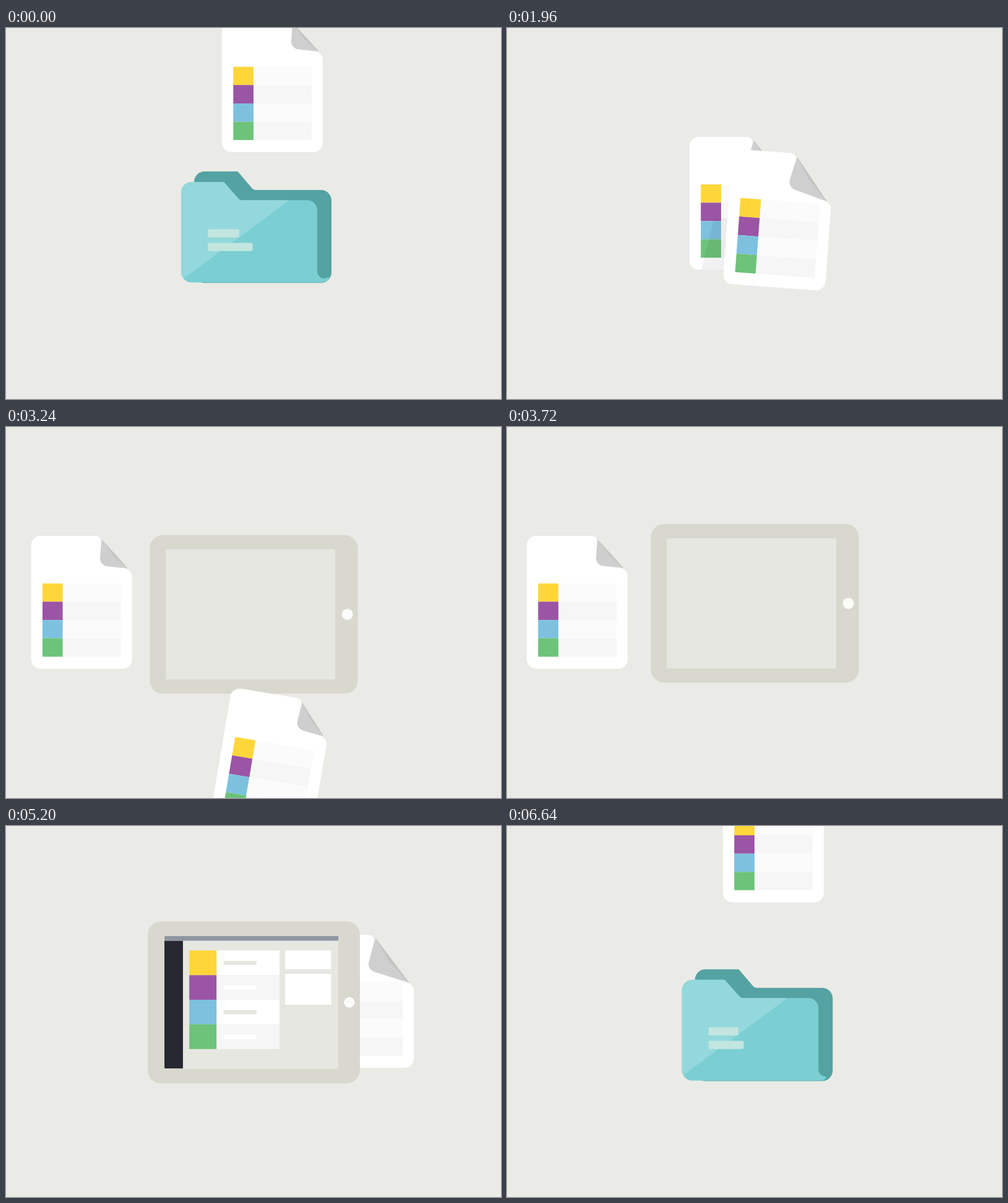
An HTML page with a canvas for the animation above (6680 ms loop, 800 px wide and 600 px high).

```html
<!DOCTYPE html>
<html lang="en">
<head>
<meta charset="utf-8">
<title>Document, folder, tablet</title>
<style>
html, body { margin: 0; width: 100%; height: 100%; overflow: hidden; background: #eaebe6; }
canvas { display: block; width: 800px; height: 600px; }
</style>
</head>
<body>
<canvas id="stage" width="800" height="600"></canvas>
<script>
const LOOP = 6680;
const BG = '#eaebe6';
const ROWS = ['#ffd63a', '#9a55a5', '#7dc1df', '#6dc37a'];
const ctx = document.getElementById('stage').getContext('2d');

const clamp = v => Math.max(0, Math.min(1, v));
const mix = (a, b, p) => a + (b - a) * p;
const part = (t, start, length) => clamp((t - start) / length);
const easeOut = p => 1 - (1 - p) ** 3;

// Cubic bezier easing with handles (a, 0) and (b, 1).
function curve(x, a = 0.8, b = 0.2) {
  if (x <= 0 || x >= 1) return clamp(x);
  let lo = 0, hi = 1, s = 0.5;
  for (let i = 0; i < 24; i++) {
    s = (lo + hi) / 2;
    const at = 3 * a * s * (1 - s) ** 2 + 3 * b * s * s * (1 - s) + s ** 3;
    if (at < x) lo = s; else hi = s;
  }
  return s * s * (3 - 2 * s);
}

// Value at time t from [time, value] steps, smoothed between them.
function keys(t, steps) {
  if (t <= steps[0][0]) return steps[0][1];
  for (let i = 1; i < steps.length; i++) {
    const [t0, v0] = steps[i - 1], [t1, v1] = steps[i];
    if (t <= t1) {
      const p = (t - t0) / (t1 - t0);
      return mix(v0, v1, p * p * (3 - 2 * p));
    }
  }
  return steps[steps.length - 1][1];
}

function box(x, y, w, h, color, r = 0) {
  if (w <= 0 || h <= 0) return;
  ctx.fillStyle = color;
  ctx.beginPath();
  ctx.roundRect(x, y, w, h, r);
  ctx.fill();
}

function shape(color, points) {
  ctx.fillStyle = color;
  ctx.beginPath();
  points.forEach(([x, y]) => ctx.lineTo(x, y));
  ctx.fill();
}

function scaled(cx, cy, k, draw) {
  ctx.save();
  ctx.translate(cx, cy);
  ctx.scale(k, k);
  ctx.translate(-cx, -cy);
  draw();
  ctx.restore();
}

const CURL = [[0, 0], [300, 0.1], [760, 0.37], [1600, 0.37], [1960, 0.8], [2400, 0.3],
  [3000, 0.04], [3720, 0], [5000, 0.1], [5200, 1], [5680, 0.3], [6680, 0]];

// Sheet of 163 x 215 at the current origin; c is how far the corner curls.
function sheet(c, shade) {
  const ax = mix(114, 101, c);
  const ix = mix(111, 87, c), iy = mix(47.5, 56, c);
  const cy = mix(53, 80, c);
  const a = [ax, 5.5], b = [156.5, cy - 1];
  const mid = [mix((a[0] + b[0]) / 2, ix, 0.12), mix((a[1] + b[1]) / 2, iy, 0.12)];
  shape('#cfcfcf', [a, b, [ix - 2, iy + 2]]);
  shape('#c4c4c4', [a, b, mid]);

  const body = new Path2D();
  body.moveTo(15, 0);
  body.arcTo(ax + 0.5, 0, ix, iy, 9);
  body.arcTo(ix, iy, 163, cy, 13);
  body.arcTo(163, cy, 163, 215, 14);
  body.arcTo(163, 215, 0, 215, 15);
  body.arcTo(0, 215, 0, 0, 15);
  body.arcTo(0, 0, 15, 0, 15);
  body.closePath();
  ctx.fillStyle = '#fff';
  ctx.fill(body);
  ROWS.forEach((color, i) => {
    const y = 77 + i * 29.6;
    box(51, y, 94, 29.6, i % 2 ? '#f6f6f6' : '#fbfbfb');
    box(18.3, y, 32.7, 29.6, color);
  });
  if (shade) {
    ctx.save();
    ctx.clip(body);
    shape('rgba(0,0,0,.055)', shade);
    ctx.restore();
  }
}

function folderState(t) {
  const u = t < 3000 ? t + LOOP : t;
  const k = u < 6640
    ? keys(u, [[6200, 0], [6480, 1.02], [6640, 1.003]])
    : keys(u, [[6640, 1.003], [6680, 1], [7360, 0.974]]);
  return { u, k, dx: -540 * curve(part(u, 7680, 950)) };
}

function inFolder(f, draw) {
  ctx.save();
  ctx.translate(f.dx, 0);
  scaled(404.5, 322, f.k, draw);
  ctx.restore();
}

function folderBack() {
  ctx.fillStyle = '#55a2a3';
  ctx.beginPath();
  ctx.moveTo(304, 300);
  ctx.arcTo(304, 232, 330, 232, 17);
  ctx.arcTo(374.5, 232, 400, 262, 3);
  ctx.arcTo(400, 262, 500, 262, 7);
  ctx.arcTo(526, 262, 526, 300, 17);
  ctx.arcTo(526, 412.2, 500, 412.2, 17);
  ctx.arcTo(304, 412.2, 304, 380, 17);
  ctx.fill();
}

function folderFront(u) {
  const lip = keys(u, [[6480, 0], [6640, 0.17], [6680, 0.8], [6960, Math.PI / 2]]);
  const sx = Math.sin(lip), sy = Math.cos(lip);
  const body = new Path2D();
  body.moveTo(283, 320);
  body.arcTo(283, 249, 310, 249, 17);
  body.arcTo(352, 249, 378, 278.5, 3);
  body.arcTo(378, 278.5, 420, 278.5, 6);
  body.arcTo(503, 278.5, 503, 320, 16);
  body.lineTo(503, 393.5);
  body.arc(514.5, 393.5, 11.5, Math.PI, Math.PI / 2 - lip, true);
  body.lineTo(509 + 17 * sx, 394.6 + 17 * sy);
  body.arc(509, 394.6, 17, Math.PI / 2 - lip, Math.PI / 2);
  body.arcTo(283, 411.6, 283, 380, 17);
  body.closePath();
  ctx.fillStyle = '#7bcfd3';
  ctx.fill(body);

  const top = keys(u, [[6480, 440], [6640, 453], [6680, 458], [7100, 464]]);
  ctx.save();
  ctx.clip(body);
  shape('#93d8dc', [[270, 240], [top + 52, 240], [top, 278.5], [top - 180, 411.6], [270, 411.6]]);
  ctx.restore();

  box(326, 325.2, keys(u, [[6400, 0], [6640, 48], [6680, 51], [7000, 47]]), 13.5, '#c2e6df', 2);
  box(326, 347.4, keys(u, [[6440, 0], [6640, 56.5], [6680, 72.5], [6900, 79.5]]), 13.3, '#c2e6df', 2);
}

function copyPose(t) {
  const p = easeOut(part(t, 1660, 740));
  const q = Math.max(0, (t - 2560) / 440);
  return {
    x: mix(428.5, 442, p) - 5.5 * q * q,
    y: mix(283.5, 317.5, p) + 19.5 * q ** 5.6,
    angle: (5.3 * p + 1.8 * q * q) * Math.PI / 180,
    k: mix(1, 1.02, p)
  };
}

function copySheet(t, pose) {
  ctx.save();
  ctx.translate(pose.x, pose.y);
  ctx.rotate(pose.angle);
  ctx.scale(pose.k, pose.k);
  ctx.translate(-81.5, -107.5);
  sheet(keys(t, CURL));
  ctx.restore();
}

// Shadow of the copy, in the coordinates of the sheet below it.
function copyShade(pose, x, y) {
  const sin = Math.sin(pose.angle), cos = Math.cos(pose.angle);
  const left = pose.x - pose.k * (81.5 * cos - 107.5 * sin) - 30 - x;
  const top = pose.y - pose.k * (81.5 * sin + 107.5 * cos) + 113 - y;
  if (top > 214) return null;
  return [[left, top], [left + 150, top], [left + 150, 215], [314 - x, 215]];
}

function docPose(t) {
  if (t >= 6200 || t < 1000) {
    const p = curve(part(t < 1000 ? t + LOOP : t, 6200, 950));
    return { x: keys(t < 1000 ? t : 0, [[0, 349], [500, 347]]), y: mix(-230, 176, p) };
  }
  let x = 347;
  x -= 52 * easeOut(part(t, 1640, 320));
  x -= 263 * curve(part(t, 2770, 600));
  x += 287 * curve(part(t, 3740, 450));
  x += 289 * curve(part(t, 5000, 680), 0.2, 0.1);
  return { x, y: 176 };
}

function app(t) {
  const grow = (start, length) => easeOut(part(t, start, length));
  if (t < 4000) return;
  ctx.save();
  ctx.beginPath();
  ctx.roundRect(256, 177.8, 281.2, 214.4, 2);
  ctx.clip();
  ctx.globalAlpha = part(t, 4000, 120);
  box(256, 177.8, 281.2, 214.4, '#e6e7e1');
  ctx.globalAlpha = 1;
  box(256, 185.4, 30, 207 * grow(4040, 360), '#282833');
  box(256, 177.8, 281.2 * grow(4000, 320), 7.6, '#8f96a0');
  ROWS.forEach((color, i) => {
    const y = 201.3 + i * 39.85;
    const start = 4080 + i * 50;
    const s = grow(start, 280);
    box(340, y, 102.3 * grow(start + 60, 300), 39.85, i % 2 ? '#f6f6f6' : '#fff');
    box(296.2, y, 44 * s, 39.85, color);
    box(351.5, y + 16.7, 53.5 * grow(start + 140, 320), 6.8, i % 2 ? '#fff' : '#e6e7e1');
  });
  box(451, 201.3, 74.5, 30.2 * grow(4180, 400), '#fff');
  box(451, 239.2, 74.5, 49.8 * grow(4260, 480), '#fff');
  ctx.restore();
}

function tablet(t) {
  const k = keys(t, [[3900, 1], [4400, 1.021], [5200, 1.021], [5640, 1]]);
  ctx.save();
  ctx.translate(0, 540 * (1 - curve(part(t, 2770, 600))));
  scaled(400.5, 285.2, k, () => {
    box(232.5, 157, 336, 256.5, '#d8d8ce', 21);
    box(258.5, 180, 273.7, 210.5, '#e6e7e1', 1);
    ctx.fillStyle = '#fbfbfa';
    ctx.beginPath();
    ctx.arc(551.7, 285.2, 9 - (k - 1) * 30, 0, 7);
    ctx.fill();
  });
  scaled(400.5, 285.2, k / 1.021, () => app(t));
  ctx.restore();
}

function draw(t) {
  box(0, 0, 800, 600, BG);
  if (t >= 6040 && t < 6200) return;
  const hasFolder = t < 2000 || t >= 6200;
  const folder = folderState(t);
  const doc = docPose(t);
  const hasCopy = t > 1660 && t < 3500;
  const copy = copyPose(t);

  if (hasFolder) inFolder(folder, folderBack);
  ctx.save();
  ctx.translate(doc.x, doc.y);
  sheet(keys(t, CURL), hasCopy && copyShade(copy, doc.x, doc.y));
  ctx.restore();
  if (hasFolder) inFolder(folder, () => folderFront(folder.u));

  if (t > 2770 && t < 6040) tablet(t);
  if (hasCopy) copySheet(t, copy);

  if (t > 5800 && t < 6040) {
    ctx.globalAlpha = part(t, 5800, 240);
    box(0, 0, 800, 600, BG);
    ctx.globalAlpha = 1;
  }
}

const begin = performance.now();
function tick() {
  draw((performance.now() - begin) % LOOP);
  requestAnimationFrame(tick);
}
tick();
</script>
</body>
</html>
```
